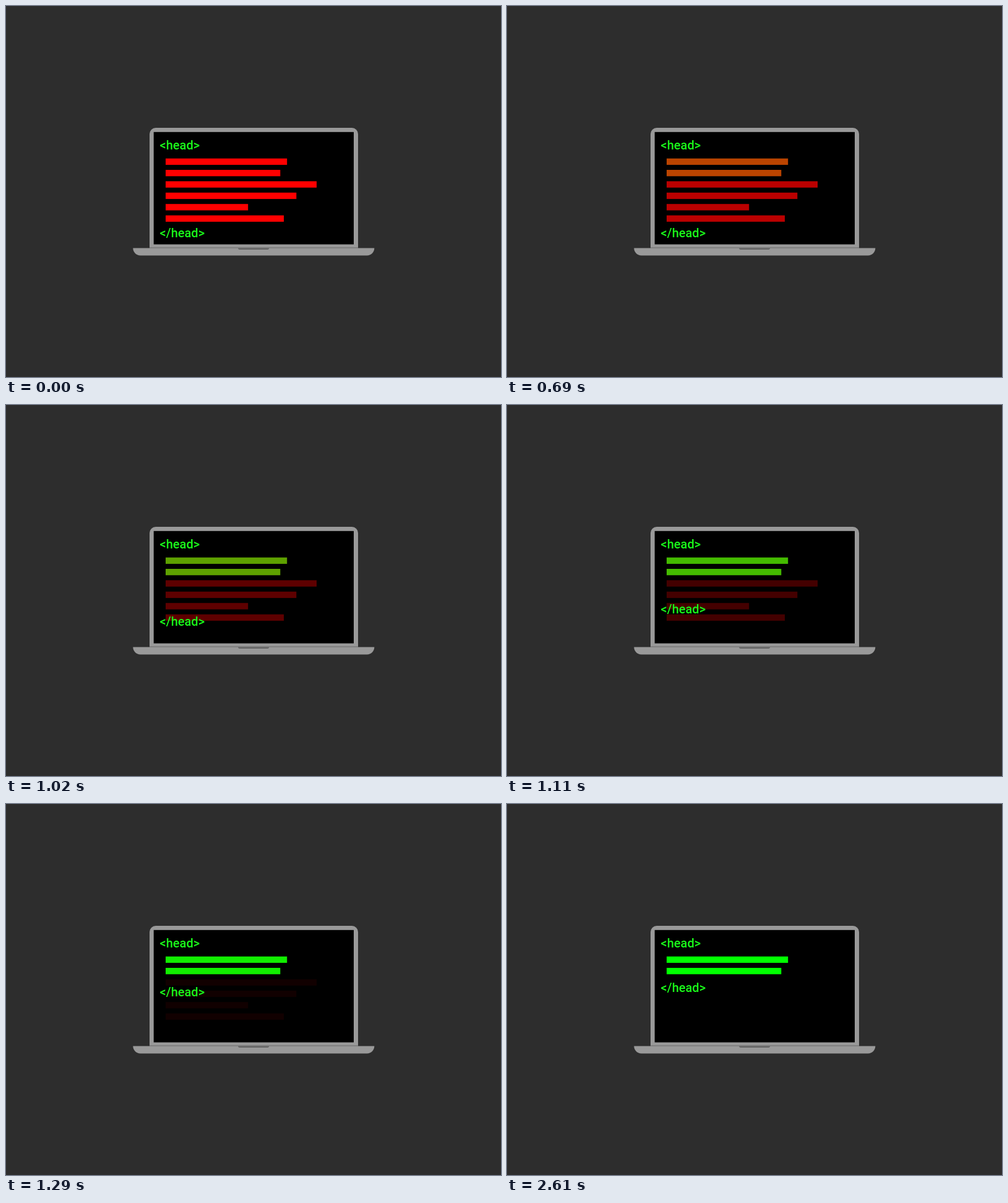
Animation of 800 by 600 pixels, one loop 3.6 s. Source, as an HTML page:

```html
<!DOCTYPE html>
<html lang="en">
<head>
<meta charset="utf-8">
<title>Laptop</title>
<style>
  html, body { margin: 0; width: 100%; height: 100%; overflow: hidden; background: #2d2d2d; }
  svg { display: block; width: 800px; height: 600px; }
  text { font: 500 20px Roboto, sans-serif; fill: #1aff1a; }
</style>
</head>
<body>
<svg viewBox="0 0 800 600">
  <path d="M232 391.5V207a10 10 0 0 1 10-10H559a10 10 0 0 1 10 10V391.5Z" fill="#999"/>
  <rect x="238.7" y="203.8" width="323.3" height="181.7"/>
  <rect x="232" y="390.4" width="337" height="1.2" fill="#707070"/>
  <path d="M205.3 391.6H595.3A11.8 11.8 0 0 1 583.5 403.4H217.1A11.8 11.8 0 0 1 205.3 391.6Z" fill="#999"/>
  <path d="M375 391.6H425.2Q425.2 394 422.5 394H377.7Q375 394 375 391.6Z" fill="#666"/>
  <g id="bars"></g>
  <text x="248.6" y="232.2">&lt;head&gt;</text>
  <text id="close" x="248.6" y="373.7">&lt;/head&gt;</text>
</svg>
<script>
const LOOP = 3600, STEP = 30;
const widths = [196.2, 185.3, 244, 211.3, 133.2, 191];
const group = document.getElementById('bars');
const closing = document.getElementById('close');

const bars = widths.map((width, i) => {
  const bar = document.createElementNS('http://www.w3.org/2000/svg', 'rect');
  const attrs = { x: 258, y: 246.6 + 18.4 * i, width, height: 10.3 };
  for (const key in attrs) bar.setAttribute(key, attrs[key]);
  return group.appendChild(bar);
});

const progress = (t, from, to) => Math.min(1, Math.max(0, (t - from) / (to - from)));

// Cubic bezier easing through (x1, 0) and (x2, 1), solved by bisection.
function ease(u, x1, x2) {
  let lo = 0, hi = 1;
  for (let i = 0; i < 24; i++) {
    const s = (lo + hi) / 2, r = 1 - s;
    const x = 3 * x1 * s * r * r + 3 * x2 * s * s * r + s * s * s;
    if (x < u) lo = s; else hi = s;
  }
  return hi * hi * (3 - 2 * hi);
}

function draw(t) {
  const fade = progress(t, 450, 1350);
  const red = Math.round(255 * (1 - fade));
  bars.forEach((bar, i) => {
    const kept = i < 2;
    bar.setAttribute('fill', kept ? `rgb(${red},${255 - red},0)` : '#f00');
    bar.setAttribute('opacity', kept ? 1 : 1 - fade);
  });
  const move = progress(t, 870, 1500);
  const lift = move === 0 ? 0 : move === 1 ? 1 : ease(move, 0.31, 0.34);
  closing.setAttribute('transform', `translate(0 ${-70 * lift})`);
}

const start = performance.now();
function tick() {
  const t = (performance.now() - start) % LOOP;
  draw(Math.floor(t / STEP) * STEP);
  requestAnimationFrame(tick);
}
draw(0);
requestAnimationFrame(tick);
</script>
</body>
</html>
```
